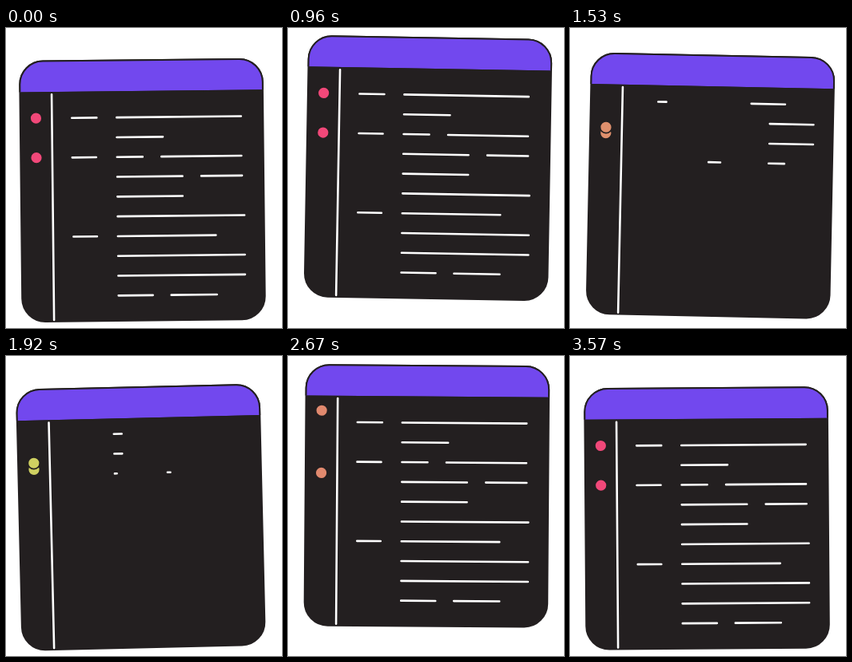
These frames come from a looping animation (345x376 px, 3600 ms). An HTML page:

```html
<!DOCTYPE html>
<html lang="en">
<head>
<meta charset="utf-8">
<title>Swaying editor</title>
<style>
html, body { margin: 0; width: 100%; height: 100%; overflow: hidden; background: #fff; }
svg { display: block; width: 345px; height: 376px; }
.dark { fill: #231f20; }
.edge { stroke: #231f20; stroke-width: 2; }
.ink { stroke: #fff; stroke-width: 2.6; stroke-linecap: round; }
.dot { stroke: #231f20; stroke-width: 1.6; }
</style>
</head>
<body>
<svg viewBox="0 0 345 376">
  <clipPath id="page"><rect x="20" y="78.8" width="305" height="288"/></clipPath>
  <g id="card">
    <rect class="dark edge" x="20.5" y="40.2" width="303.5" height="326.5" rx="29"/>
    <path class="edge" fill="#7248ee" d="M20.5 78.8V69.2a29 29 0 0 1 29-29H295a29 29 0 0 1 29 29V78.8"/>
    <rect class="dark" x="20.5" y="78.8" width="303.5" height="2"/>
    <path class="ink" d="M60.1 82V364.7"/>
    <g clip-path="url(#page)"><g id="rows"></g></g>
    <circle class="dot" cx="40.2" r="7.4"/>
    <circle class="dot" cx="40.2" r="7.4"/>
  </g>
</svg>
<script>
const LOOP = 3600, STEP = 30, SWAY = 1800;
const TOP = 111.8, ROW = 24.8, MIDDLE = 136.4;
const PINK = [241, 72, 121], GREEN = [205, 215, 96];

// Start and end of each dash, row by row
const ROWS = [
  [84, 117, 140, 297.5],
  [140, 199.5],
  [84, 116, 140, 174, 195.5, 297.5],
  [140, 223.5, 245, 298],
  [140, 223.5],
  [140, 300.5],
  [84.5, 116, 140, 264.5],
  [140, 300.5],
  [140, 300.5],
  [140, 185, 206, 265]
];

// Tables of [time, value], eased between entries
const SCROLL = [[1000, 0], [1800, -219], [2300, 0]];
const HEAD = [[1040, 0], [1850, 1]];
const TAIL = [[1850, 0], [2310, 1]];
const GAP = [[1000, ROW], [1700, 0], [2840, 41.6], [3570, ROW]];
const TINT = [[1000, 0], [2060, 1], [2300, 1], [3000, 0]];

const card = document.getElementById('card');
const rows = document.getElementById('rows');
const dots = [...document.querySelectorAll('.dot')].reverse();
const dashes = [];

ROWS.forEach((row, r) => {
  for (let i = 0; i < row.length; i += 2) {
    const el = document.createElementNS('http://www.w3.org/2000/svg', 'path');
    el.setAttribute('class', 'ink');
    rows.append(el);
    dashes.push({ el, a: row[i] + 1, b: row[i + 1] - 1, y: TOP + r * ROW });
  }
});

function tween(keys, t) {
  if (t <= keys[0][0]) return keys[0][1];
  for (let i = 1; i < keys.length; i++) {
    const [t0, v0] = keys[i - 1], [t1, v1] = keys[i];
    if (t < t1) {
      const u = (t - t0) / (t1 - t0);
      return v0 + (v1 - v0) * u * u * (3 - 2 * u);
    }
  }
  return keys[keys.length - 1][1];
}

function draw(t) {
  const phase = t / SWAY * 2 * Math.PI;
  const lift = 14.1 * (Math.cos(phase) - 1);
  const angle = -2 * Math.sin(phase + Math.PI / 10);
  card.setAttribute('transform', `translate(0 ${lift}) rotate(${angle} 172 365)`);

  rows.setAttribute('transform', `translate(0 ${tween(SCROLL, t)})`);
  const leaving = t < HEAD[1][0];
  const head = leaving ? tween(HEAD, t) : 0;
  const tail = leaving ? 1 : tween(TAIL, t);
  for (const { el, a, b, y } of dashes) {
    const w = b - a;
    el.setAttribute('d', tail - head > 0.005 ? `M${a + w * head} ${y}H${a + w * tail}` : '');
  }

  const gap = tween(GAP, t), tint = tween(TINT, t);
  const color = PINK.map((c, i) => Math.round(c + (GREEN[i] - c) * tint));
  dots.forEach((dot, i) => {
    dot.setAttribute('cy', MIDDLE + (i ? gap : -gap));
    dot.setAttribute('fill', `rgb(${color})`);
  });
}

const start = performance.now();
function tick() {
  const t = (performance.now() - start) % LOOP;
  draw(Math.floor(t / STEP) * STEP);
  requestAnimationFrame(tick);
}
draw(0);
requestAnimationFrame(tick);
</script>
</body>
</html>
```
